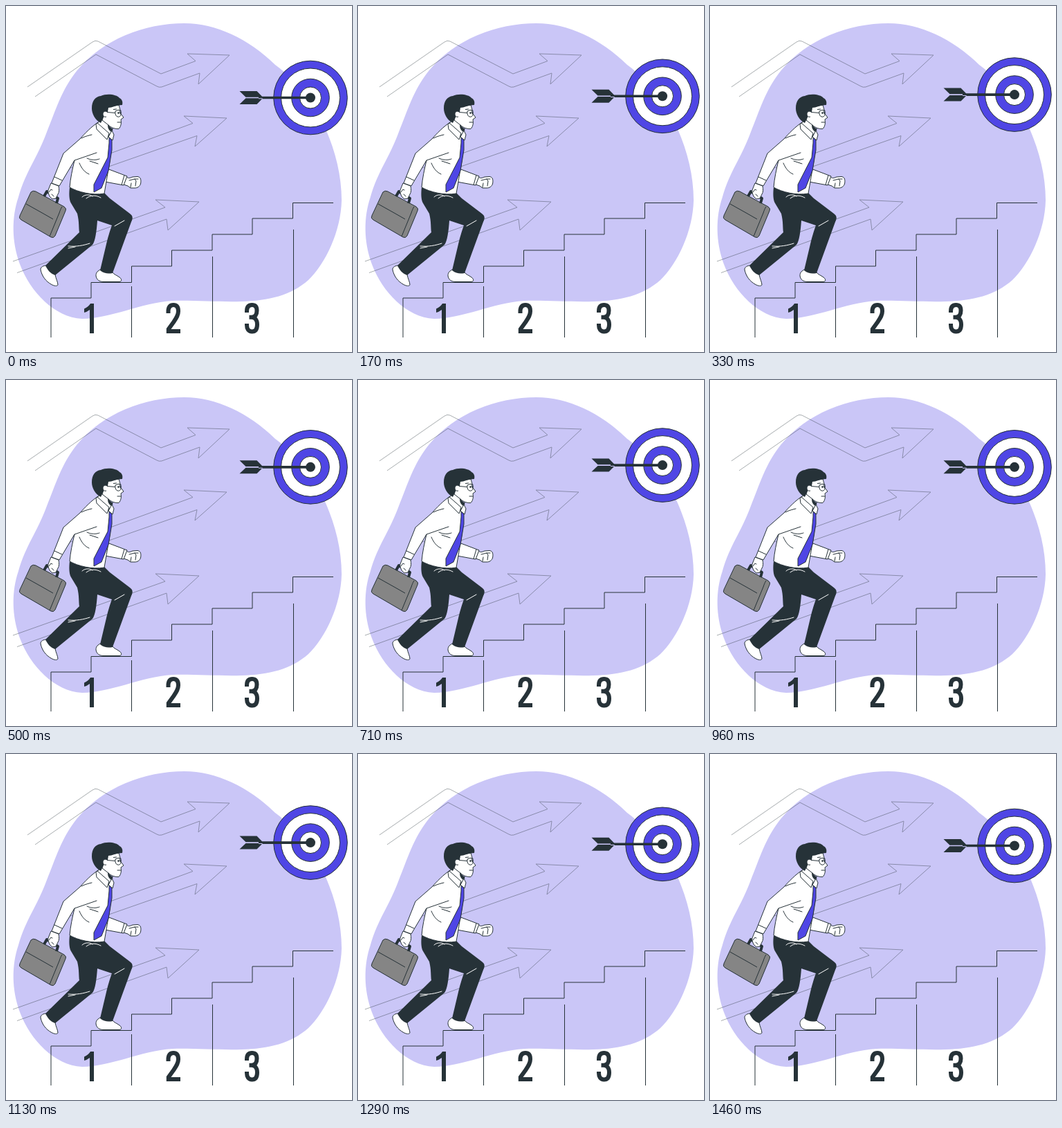
These frames come from a looping animation (500x500 px, 1500 ms). An HTML page:

```html
<!DOCTYPE html>
<html lang="en">
<head>
<meta charset="utf-8">
<title>Steps to success</title>
<style>
  html, body { margin: 0; width: 100%; height: 100%; overflow: hidden; background: #fff; }
  svg { display: block; width: 100vw; height: 100vh; }
  .line { fill: none; stroke: #263238; stroke-width: 1; }
  .white { fill: #fff; stroke: #263238; stroke-width: 1; stroke-linejoin: round; }
  .dark { fill: #263238; }
  .purple { fill: #4f46e5; stroke: #263238; stroke-width: 1; }
  .grey { fill: #858585; stroke: #263238; stroke-width: 1; stroke-linejoin: round; }
  .crease { fill: none; stroke: #fff; stroke-width: 1; stroke-linecap: round; }
  .round { stroke-linecap: round; stroke-linejoin: round; }
  .digit { fill: none; stroke: #263238; stroke-width: 6; }
</style>
</head>
<body>
<svg viewBox="0 0 500 500">
  <path id="blob" fill="#cac6f7" d="M258 25 C303 25 350 47 389 85 C425 112 447 143 462 178 C476 210 485 245 485 281
    C484 325 462 372 437 396 C412 418 380 426 340 427 C310 428 270 425 240 426 C195 429 150 452 110 452
    C70 450 35 413 20 373 C8 340 8 305 18 276 C28 240 45 220 59 182 C72 150 80 122 102 94 C140 48 200 25 258 25Z"/>

  <g id="arrows" class="line" opacity=".4">
    <path d="M31 117 L125 52 Q129 49 133 51 L224 98 L274 79.500 L262 69 L323 71 L278 113 L280 97 L225 117 Q221 118 218 116 L130 70 L42 131"/>
    <path d="M93 234 L270 169.500 L257 159 L319 162 L273 203 L276 187.500 L120 242"/>
    <path d="M10 369 L230 291 L216 280 L279 283 L234 324 L232 308 L16 385.500"/>
  </g>

  <g id="stairs" class="line">
    <path d="M65 479 V422 H123 V399.500 H181.500 V376 H239.500 V353 H298 V330 H356 V307 H414.500 V284.500 H473"/>
    <path d="M181.500 405 V479 M298.500 362 V479 M415.500 323 V479"/>
  </g>

  <g id="numbers" role="img" aria-label="1 2 3">
    <path class="dark" d="M121 473 V439 Q117 442 113 443 V437.500 Q119 435 122 430 H127 V473Z"/>
    <path class="digit" d="M234.500 444 V441.500 C234.500 435 237 432 242 432 S249 435.500 249 441 C249 447 246 451 242 457 L234.800 467 V470 H252"/>
    <path class="digit" d="M348 443 V441 C348 435 350.500 432 355.500 432 S362.500 435 362.500 440 C362.500 446 360 449.800 355 449.800 H351.500
      M355 449.800 C360 450 363 454 363 460 C363 467 360.500 470.500 355.500 470.500 S348 467 348 461 V459"/>
  </g>

  <g id="bullseye">
    <circle class="purple" r="53.300"/>
    <circle class="white" r="42.500"/>
    <circle class="purple" r="27.300"/>
    <circle class="white" r="15.500"/>
    <circle class="dark" r="7"/>
    <path class="dark" d="M-75 -1.800 H0 V1.800 H-75Z M-102.500 -9.500 H-77.500 L-69 -.8 H-93.500Z M-102.500 9.500 H-77.500 L-69 .8 H-93.500Z"/>
  </g>

  <g id="case">
    <path class="grey" d="M36 269 Q39 266 43 268 L84 290 Q88 293 86 296 L71 332 Q69 336 65 334 L22 309 Q18 307 20 303Z"/>
    <path class="line" d="M29 286 L54 300 L68 308 M81 290 C79 293 78 296 77 299 L63 333"/>
    <path d="M55 275 L59 268 L75 278 L73 285" fill="none" stroke="#263238" stroke-width="4" stroke-linejoin="round"/>
  </g>

  <g id="man">
    <path class="white" d="M65 256 L61 266 C60 269 62 272 63 275 L67 279 L72 278 L75 272 C77 269 77 265 76 260Z"/>
    <path class="line round" d="M62 269 L65 265 L67 266 M66 272 L69 275"/>

    <path class="white" d="M174 247 C178 250 180 248 183 247 L190 246.500 C195 247 195.500 252 194.500 257 C193 261 190 263 186 263 L180 263 L176 260 L170 258Z"/>
    <path class="line round" d="M178 252 L186 250 L188 253 L187 260 M181 256 L180 262 M186 250 L191 250"/>
    <path class="white" d="M146 235 L175 246 L170 259 L143 254Z"/>
    <path class="line" d="M171 244.500 L167 258.500"/>

    <path class="white" d="M57 375 C52 376 50 378 50 381 C52 391 58 398 65 402 C70 405 74 405 75 403 C75 399 72 394 71 388Z"/>
    <path class="white" d="M136 381 C131 384 130 386 130 390 C131 396 135 398 140 398.500 H164 C168 398 167 394 164 392 C160 389 156 388 154 385Z"/>
    <path class="dark" d="M92 262 C91 270 91 280 94 285 L103 300 C106 312 105 322 106 327 L57 375 C60 382 65 387 71 389
      L125 345 C129 340 131 325 132 310 L153 317 C149 328 147 336 145 344 L136 382 C142 387 148 387 154 386
      L181 312 C184 306 183 303 179 300 L150 278 L141 269 C130 274 106 270 92 262Z"/>
    <path class="crease" d="M110 276 C114 272 121 272 125 275 M116 278 C122 273 130 273 137 277 M90 347 C102 348 112 346 121 343 M90 350 L100 348 M157 318 L171 310"/>

    <path class="white" d="M133 168 C124 174 114 184 107 192 L83 213 L66 256 L77 260 L99 223 C96 236 93 249 92 262
      C104 269 125 274 142 271 L148 236 C151 222 152 205 151 192 L143 178Z"/>
    <path class="line round" d="M99 223 L131 212 M70 247 L81 252 M117 220 C123 223 130 223 135 221 M106 227 C109 234 113 240 120 243 M121 224 L133 228 M109 191 C115 188 120 187 124 186"/>
    <path class="purple" d="M149 190 L153 194 L153 208 L148 238 L138 263 L127 269 L127 258 L147 219 L149 198Z"/>

    <path class="white" d="M138 162 L132 170 L149 187 L154 180 L149 173Z"/>
    <path class="dark" d="M147 171 C150 175 152 177 155 177 L152 182 C148 179 147 176 147 171Z"/>
    <path class="white" d="M132 169 L149 184 L146 193 L131 178 L130 171Z"/>
    <path class="white" d="M153 180 L156 186 L154 194 L148 189Z"/>

    <path class="white" d="M143 146 L163 143 L165 150 L164.500 154 L170 161 L166 164 C167 170 166 174 163 177.500 C158 178 152 176 148 172 L139 165Z"/>
    <path class="dark" d="M137 169 C129 165 124 156 124 148 C124 137 129 131 137 130 C146 126 160 128 164 133
      C168 135 169 139 168 143 C160 143 153 147 148 147 L147 153 L143 154 L141 161Z"/>
    <path class="white" d="M146 153 C143 151 140 153 140 156 C140 159 142 161 145 160"/>
    <path class="line" d="M146 153.500 L158 154.500 M164 155 L167 154 M155 149.500 L160 149"/>
    <path class="line" d="M158 152 Q162 149 166 151 V157 Q165 161 161 160 Q157 158 158 152Z"/>
    <path class="line round" d="M161 168 L166 168"/>
    <path class="dark" d="M161.500 153 H163.300 V156 H161.500Z"/>
  </g>
</svg>
<script>
  const LOOP = 1500, STEPS = 36, LIFT = 10;
  const bullseye = document.getElementById('bullseye');

  // The bullseye rises and falls at constant speed, in steps of 1/24 s.
  function draw(ms) {
    const step = Math.floor((ms % LOOP + 5) * STEPS / LOOP) % STEPS;
    const phase = (step + 0.5) / STEPS;
    const rise = LIFT * (1 - Math.abs(2 * phase - 1));
    bullseye.setAttribute('transform', `translate(440 ${(132.8 - rise).toFixed(2)})`);
  }

  const start = performance.now();
  function tick(now) {
    draw(Math.max(0, now - start));
    requestAnimationFrame(tick);
  }
  draw(0);
  requestAnimationFrame(tick);
</script>
</body>
</html>
```
